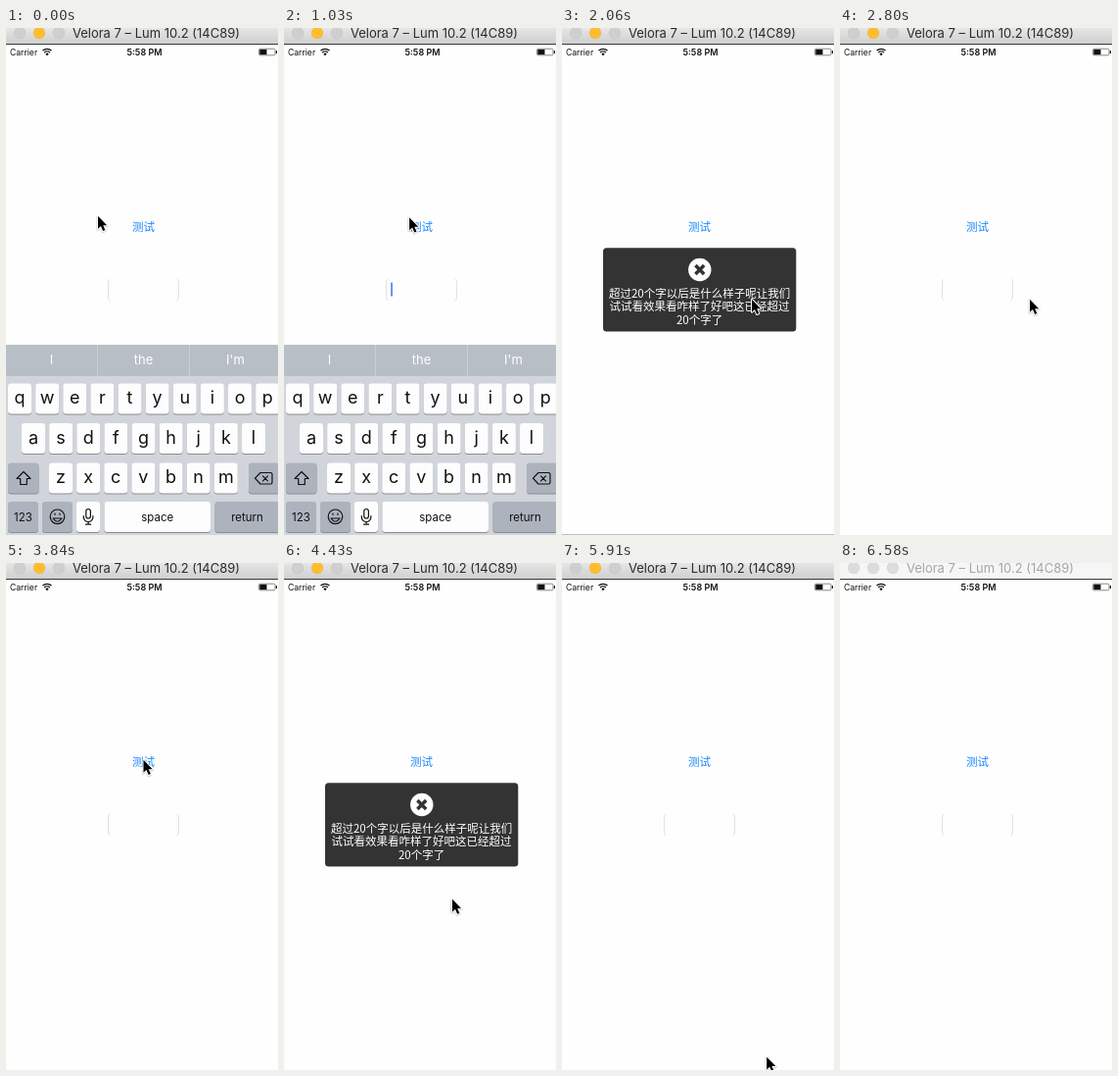
An HTML page that plays this animation: 278 px wide and 517 px high, repeating every 6.68 s.

```html
<!DOCTYPE html>
<html lang="zh">
<head>
<meta charset="utf-8">
<title>Toast demo</title>
<style>
html, body { margin: 0; width: 100%; height: 100%; overflow: hidden; background: #fefefe; }
svg { display: block; font-family: Inter, Roboto, sans-serif; }
.mid { text-anchor: middle; }
.cjk { font-family: "Noto Sans CJK SC", "Noto Sans CJK", sans-serif; text-anchor: middle; }
.line { fill: none; stroke: #111; stroke-width: 1.2; stroke-linejoin: round; stroke-linecap: round; }
</style>
</head>
<body>
<svg width="278" height="517" viewBox="0 0 278 517">
  <defs>
    <linearGradient id="steel" x2="0" y2="1">
      <stop stop-color="#e6e6e6"/><stop offset="1" stop-color="#cfcfcf"/>
    </linearGradient>
    <path id="arrow" d="M0 0V13L3 10.2 5.2 15.2 7.4 14.2 5.2 9.4H9.2Z" stroke-linejoin="round"/>
  </defs>
  <rect width="278" height="517" fill="#fefefe"/>

  <!-- window title -->
  <rect id="bar" width="278" height="16"/>
  <g id="lights" stroke="#000" stroke-opacity=".08" stroke-width=".6">
    <circle cx="14" cy="5" r="6"/>
    <circle id="amber" cx="34" cy="5" r="6"/>
    <circle cx="54" cy="5" r="6"/>
  </g>
  <text id="title" class="mid" x="153.5" y="10" font-size="13">Velora 7 – Lum 10.2 (14C89)</text>
  <rect y="16" width="278" height="1" fill="#3a3638"/>

  <!-- status bar -->
  <g fill="#111">
    <text x="4" y="27.5" font-size="8.6">Carrier</text>
    <text class="mid" x="141.5" y="27.5" font-size="9" font-weight="600">5:58 PM</text>
    <path d="M42 28.3l-1.7-1.9a2.5 2.5 0 0 1 3.4 0z"/>
    <path d="M39.1 25a4.2 4.2 0 0 1 5.8 0M37.5 23.1a6.6 6.6 0 0 1 9 0" fill="none" stroke="#111" stroke-width="1.3"/>
    <rect x="258.5" y="21.2" width="16.5" height="6.6" rx="1.3" fill="none" stroke="#555" stroke-width=".7"/>
    <rect x="259.3" y="21.9" width="7.2" height="5.2"/>
    <rect x="275.8" y="23" width="1.2" height="3" rx=".5"/>
  </g>

  <!-- page -->
  <text id="button" class="cjk" x="140.5" y="206.5" font-size="11.5" font-weight="500" fill="#1686ff">测试</text>
  <path d="M106.5 256.5q-2 0-2 2.5v16q0 2.5 2 2.5M174.5 256.5q2 0 2 2.5v16q0 2.5-2 2.5" fill="none" stroke="#e2e2e2"/>
  <rect id="caret" x="109.3" y="259.5" width="1.5" height="14" fill="#426bf2"/>

  <g id="keyboard"></g>

  <g id="toast">
    <rect x="42" y="224.3" width="197.3" height="85.2" rx="3.5" fill="#333"/>
    <circle cx="140.8" cy="246.5" r="11.7" fill="#fff"/>
    <path d="M136.4 242.1l8.8 8.8m0-8.8l-8.8 8.8" stroke="#333" stroke-width="3.5"/>
    <g class="cjk" font-size="11.5" fill="#fff">
      <text x="140.6" y="274.7">超过20个字以后是什么样子呢让我们</text>
      <text x="140.6" y="288.2">试试看效果看咋样了好吧这已经超过</text>
      <text x="140.6" y="301.7">20个字了</text>
    </g>
  </g>

  <g id="pointer">
    <use href="#arrow" x=".4" y="1.4" stroke="#000" stroke-width="3" opacity=".16"/>
    <use href="#arrow" x=".5" y=".8" fill="#fff" stroke="#fff" stroke-width="2"/>
    <use href="#arrow" x=".5" y=".8"/>
  </g>
</svg>
<script>
const LOOP = 6680;
const BEAT = 147.7; // the picture is refreshed once per beat
const $ = id => document.getElementById(id);
const set = (id, name, value) => $(id).setAttribute(name, value);
const clamp = v => Math.min(1, Math.max(0, v));
const within = (k, from, to) => k >= from && k < to;

// Keyboard, drawn from rows of keys
function key(x, y, w, label, dark, size = 18) {
  const box = (dy, fill) =>
    `<rect x="${x}" y="${y + dy}" width="${w}" height="31" rx="3.2" fill="${fill}"/>`;
  const dip = size > 14 ? 20.5 : 19.5;
  return box(1, '#898d93') + box(0, dark ? '#acb3bd' : '#fdfdfd') +
    `<text class="mid" x="${x + w / 2}" y="${y + dip}" font-size="${size}" fill="#111">${label}</text>`;
}

function row(letters, x, y) {
  return [...letters].map((c, i) => key(x + i * 28.13, y, 24, c)).join('');
}

function hint(text, i) {
  return `<text class="mid" x="${46.5 + 94 * i}" y="343" font-size="13" fill="#fff">${text}</text>`;
}

$('keyboard').innerHTML =
  '<rect y="323" width="278" height="194" fill="#d1d5db"/>' +
  '<rect y="323" width="278" height="32" fill="#b7bec6"/>' +
  '<path d="M93.5 323v32M187.5 323v32" stroke="#c9ced4"/>' +
  ['I', 'the', "I'm"].map(hint).join('') +
  row('qwertyuiop', 2, 362.5) + row('asdfghjkl', 16, 403) + row('zxcvbnm', 44, 443.5) +
  key(2, 443.5, 31.5, '', true) + key(248, 443.5, 31.5, '', true) +
  key(2, 483, 31, '123', true, 11.5) + key(37, 483, 31, '', true) + key(72, 483, 24, '') +
  key(100.5, 483, 108.5, 'space', false, 11.5) + key(213.5, 483, 66, 'return', true, 11.5) +
  `<g class="line">
    <path d="M18 452.5l7 7h-3.7v6h-6.6v-6H11z"/>
    <path d="M260 453.5h10.5q1.5 0 1.5 1.5v8.5q0 1.5-1.5 1.5H260l-5.5-5.8zM262.5 456.8l5 5m0-5l-5 5"/>
    <circle cx="52.5" cy="498.3" r="7.3"/>
    <path d="M48 500q4.5 6.5 9 0zM50 495v1.3M55 495v1.3"/>
    <rect x="81.8" y="490.5" width="4.6" height="9.5" rx="2.3"/>
    <path d="M79.3 497.5v1.2a4.8 4.8 0 0 0 9.6 0v-1.2M84.1 503.5v2.7M81.6 506.2h5"/>
  </g>`;

// Pointer rests at these places and travels between them
const rest = [93.5, 191], press = [145, 201], side = [193.5, 276],
  again = [140, 200], low = [171.5, 342], out = [215, 530];

// A leg runs from one beat to another along a cubic curve; pow shapes the easing
const leg = (from, to, pow, a, d, b = a, c = d) => ({ from, to, pow, a, b, c, d });
const legs = [
  leg(2, 10, 1, rest, press, [106, 179], [135, 196]),
  leg(11, 14, 2.6, press, side),
  leg(21, 26, 1, side, again, [270, -70], [20, -70]),
  leg(28, 30, 1.8, again, low),
  leg(35, 41, 1.5, low, out)
];

function place(k) {
  const { from, to, pow, a, b, c, d } = legs.findLast(l => l.from <= k) || legs[0];
  const u = clamp((k - from) / (to - from)) ** pow, v = 1 - u;
  return a.map((_, i) =>
    v ** 3 * a[i] + 3 * v * v * u * b[i] + 3 * v * u * u * c[i] + u ** 3 * d[i]);
}

function draw(t) {
  const k = Math.floor((t + 10) / BEAT);
  const pressed = within(k, 11, 14) || within(k, 28, 30);
  const toast = within(k, 14, 19) || within(k, 30, 35);
  const blink = clamp(.5 + 1.2 * Math.cos((k - 1) / 7 * 2 * Math.PI));
  const slide = 194 * (1 - Math.exp(-5.3 * Math.max(0, k - 13)));
  const active = t < 6580;

  set('pointer', 'transform', `translate(${place(k)})`);
  set('keyboard', 'transform', `translate(0 ${slide})`);
  set('caret', 'opacity', within(k, 1, 14) ? blink : 0);
  set('button', 'opacity', pressed ? .2 : 1);
  set('toast', 'opacity', toast ? 1 : 0);
  set('bar', 'fill', active ? 'url(#steel)' : '#f6f6f6');
  set('lights', 'fill', active ? '#cfcfcf' : '#dcdcdc');
  set('amber', 'fill', active ? '#ffbd2e' : '#dcdcdc');
  set('title', 'fill', active ? '#2b2b2b' : '#a6a6a6');
}

const start = performance.now();
function tick() {
  draw((performance.now() - start) % LOOP);
  requestAnimationFrame(tick);
}
tick();
</script>
</body>
</html>
```
